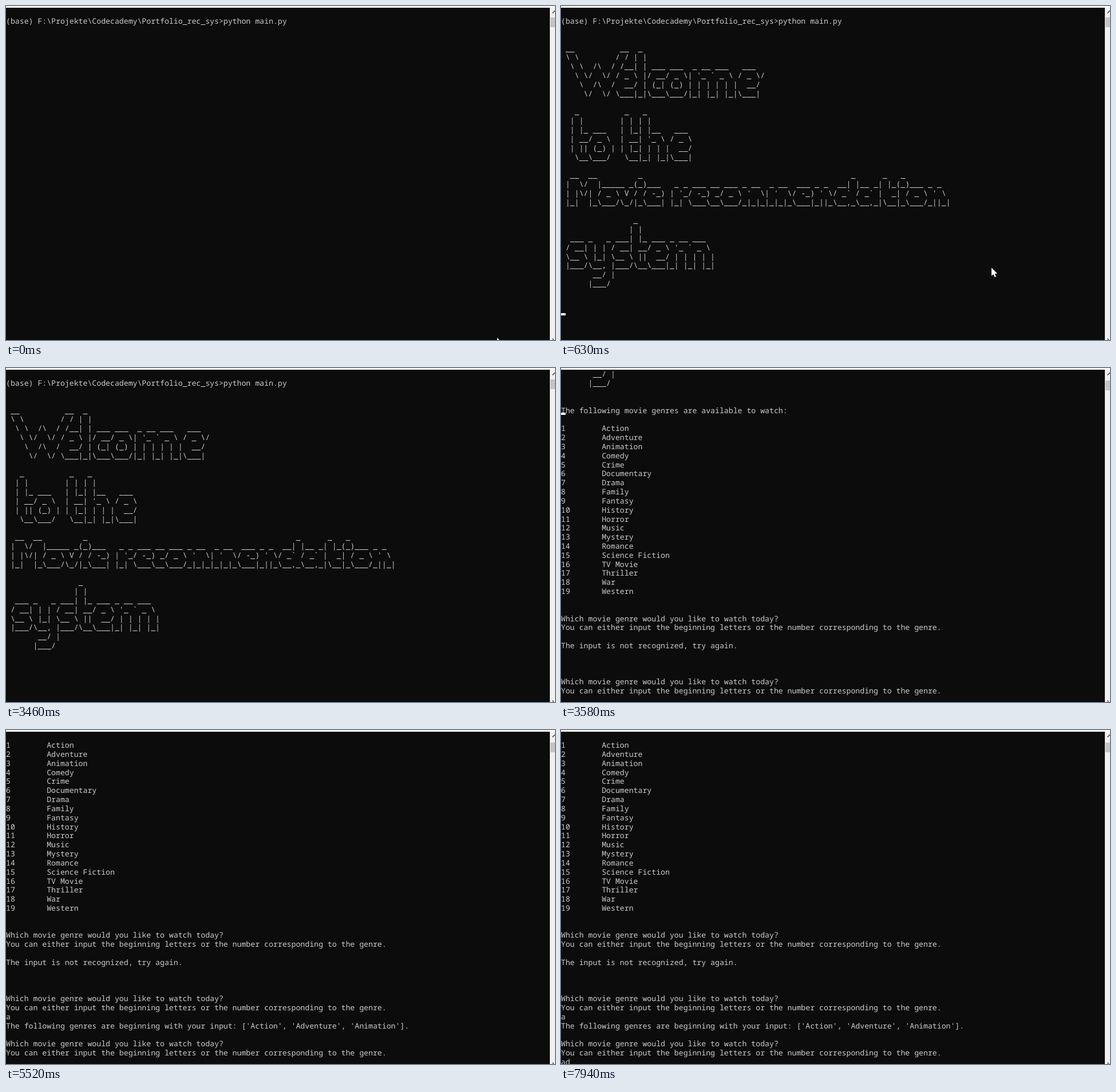
Animation of 959 by 584 pixels, one loop 8000 ms. Source, as an HTML page:

```html
<!DOCTYPE html>
<html lang="en">
<head>
<meta charset="utf-8">
<title>Movie recommendation console</title>
<style>
  html, body { margin: 0; width: 100%; height: 100%; overflow: hidden; background: #fff; }
  #stage { position: relative; width: 959px; height: 584px; overflow: hidden; background: #fff; }
  #screen { position: absolute; left: 0; top: 3px; width: 950px; height: 581px; overflow: hidden; background: #0c0c0c; }
  pre {
    position: absolute; left: 0; top: 0; margin: 0; color: #ccc;
    font: 13.2px/15.83px "Noto Sans Mono", "DejaVu Sans Mono", monospace;
    text-rendering: geometricPrecision; font-variant-ligatures: none;
  }
  #caret { position: absolute; left: 0; width: 8px; height: 4px; background: #fff; }
  #bar { position: absolute; left: 950px; top: 3px; width: 9px; height: 581px; background: #f0f0f0; }
  #thumb { position: absolute; left: 951px; width: 8px; height: 17px; background: #c4c4c4; }
  svg { position: absolute; left: 0; top: 0; }
</style>
</head>
<body>
<div id="stage">
  <div id="screen">
<pre id="log">

(base) F:\Projekte\Codecademy\Portfolio_rec_sys>python main.py
<span data-at="630">

 __          __  _
 \ \        / / | |
  \ \  /\  / /__| | ___ ___  _ __ ___   ___
   \ \/  \/ / _ \ |/ __/ _ \| '_ ` _ \ / _ \/
    \  /\  /  __/ | (_| (_) | | | | | |  __/
     \/  \/ \___|_|\___\___/|_| |_| |_|\___|

   _          _   _
  | |        | | | |
  | |_ ___   | |_| |__   ___
  | __/ _ \  | __| '_ \ / _ \
  | || (_) | | |_| | | |  __/
   \__\___/   \__|_| |_|\___|

  __  __         _                                              _      _   _
 |  \/  |_____ _(_)___   _ _ ___ __ ___ _ __  _ __  ___ _ _  __| |__ _| |_(_)___ _ _
 | |\/| / _ \ V / / -_) | '_/ -_) _/ _ \ '  \| '  \/ -_) ' \/ _` / _` |  _| / _ \ ' \
 |_|  |_\___/\_/|_\___| |_| \___\__\___/_|_|_|_|_|_\___|_||_\__,_\__,_|\__|_\___/_||_|

                _
               | |
  ___ _   _ ___| |_ ___ _ __ ___
 / __| | | / __| __/ _ \ '_ ` _ \
 \__ \ |_| \__ \ ||  __/ | | | | |
 |___/\__, |___/\__\___|_| |_| |_|
       __/ |
      |___/
</span><span data-at="3580">

The following movie genres are available to watch:

1        Action
2        Adventure
3        Animation
4        Comedy
5        Crime
6        Documentary
7        Drama
8        Family
9        Fantasy
10       History
11       Horror
12       Music
13       Mystery
14       Romance
15       Science Fiction
16       TV Movie
17       Thriller
18       War
19       Western


Which movie genre would you like to watch today?
You can either input the beginning letters or the number corresponding to the genre.

The input is not recognized, try again.



Which movie genre would you like to watch today?
You can either input the beginning letters or the number corresponding to the genre.
</span><span data-at="5090">a
</span><span data-at="5520">The following genres are beginning with your input: ['Action', 'Adventure', 'Animation'].

Which movie genre would you like to watch today?
You can either input the beginning letters or the number corresponding to the genre.
</span><span data-at="7710">a</span><span data-at="7940">d</span>
</pre>
    <div id="caret"></div>
  </div>
  <div id="bar"></div>
  <div id="thumb"></div>
  <svg width="959" height="584">
    <path d="M954.5 12.5L959 8M954.5 581.5L957 584" fill="none" stroke="#505050" stroke-width="1.6"/>
    <path id="mouse" d="M0 0V14.5L3.3 11.4L5.6 16.8L8 15.8L5.7 10.6H10.2Z" fill="#fff"/>
  </svg>
</div>
<script>
const LOOP = 8000, ROW = 15.83, TOP = 0.3;
const $ = id => document.getElementById(id);
const parts = [...document.querySelectorAll('[data-at]')];

// Each track: [start ms, values...]; a value holds until the next entry.
const scroll = [[0, 0, 20], [3580, 29, 22], [5520, 34, 22]];  // lines, thumb y
const caret = [[0, -1], [510, 2], [630, 33], [1280, -1], [1830, 33], [2360, -1],
               [2910, 33], [3460, -1], [3580, 33], [5520, -1]];
const mouse = [[0, 858, 580], [100, 812, 528], [190, 771, 480], [290, 752, 457.5],
               [1040, 790, 464], [1160, 860, 478], [1280, 929, 492], [1400, -50, -50]];

const at = (track, t) => track.findLast(step => step[0] <= t);

function render(t) {
  const [, lines, thumbY] = at(scroll, t);
  const [, row] = at(caret, t);
  const [, x, y] = at(mouse, t);
  for (const p of parts) p.style.visibility = t >= +p.dataset.at ? 'visible' : 'hidden';
  $('log').style.top = TOP - lines * ROW + 'px';
  $('thumb').style.top = thumbY + 'px';
  $('caret').style.visibility = row < 0 ? 'hidden' : 'visible';
  $('caret').style.top = Math.round((row - lines + 1) * ROW - 4) + 'px';
  $('mouse').setAttribute('transform', `translate(${x} ${y})`);
}

function tick() {
  render(performance.now() % LOOP);
  requestAnimationFrame(tick);
}
tick();
</script>
</body>
</html>
```
